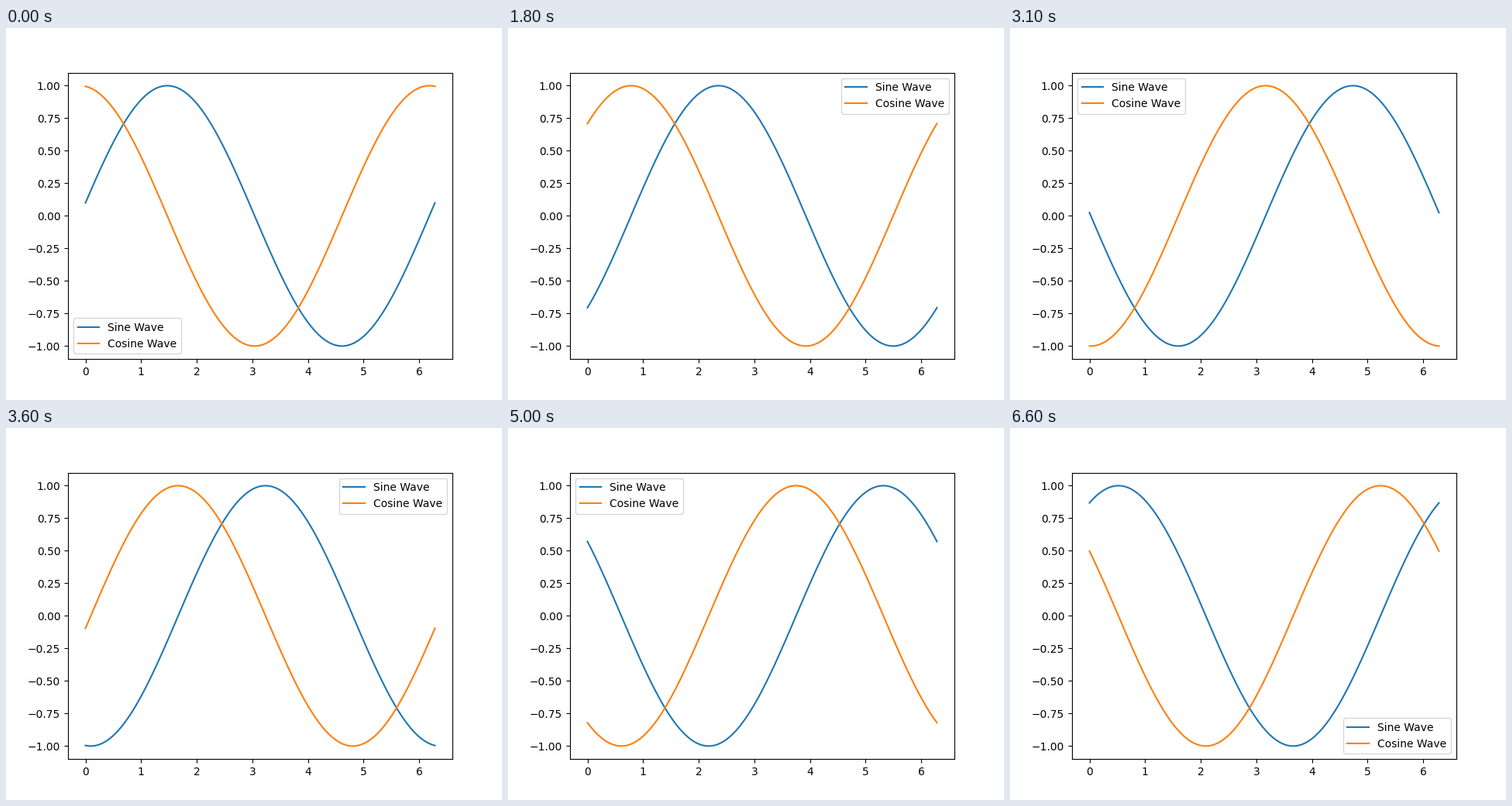
Recreate the animation shown at these times as a matplotlib script. Size 640 px wide and 480 px high, loop 6700 ms.

```python
import matplotlib.pyplot as plt
import numpy as np
from matplotlib.animation import FuncAnimation

FRAMES = 67
INTERVAL = 100
PHASE_START = 0.1
PHASE_STEP = 0.3

x = np.linspace(0, 2 * np.pi, 100)

fig, ax = plt.subplots(figsize=(6.4, 4.8), dpi=100)
sine, = ax.plot(x, np.sin(x), label="Sine Wave")
cosine, = ax.plot(x, np.cos(x), label="Cosine Wave")
# "best" is re-evaluated on every draw, so the legend dodges the curves
ax.legend(loc="best")


def update(frame):
    phase = PHASE_START + PHASE_STEP * frame
    sine.set_ydata(np.sin(x + phase))
    cosine.set_ydata(np.cos(x + phase))
    return sine, cosine


ani = FuncAnimation(fig, update, frames=FRAMES, init_func=lambda: update(0),
                    interval=INTERVAL, repeat=True, repeat_delay=0, blit=False)

plt.show()
```
